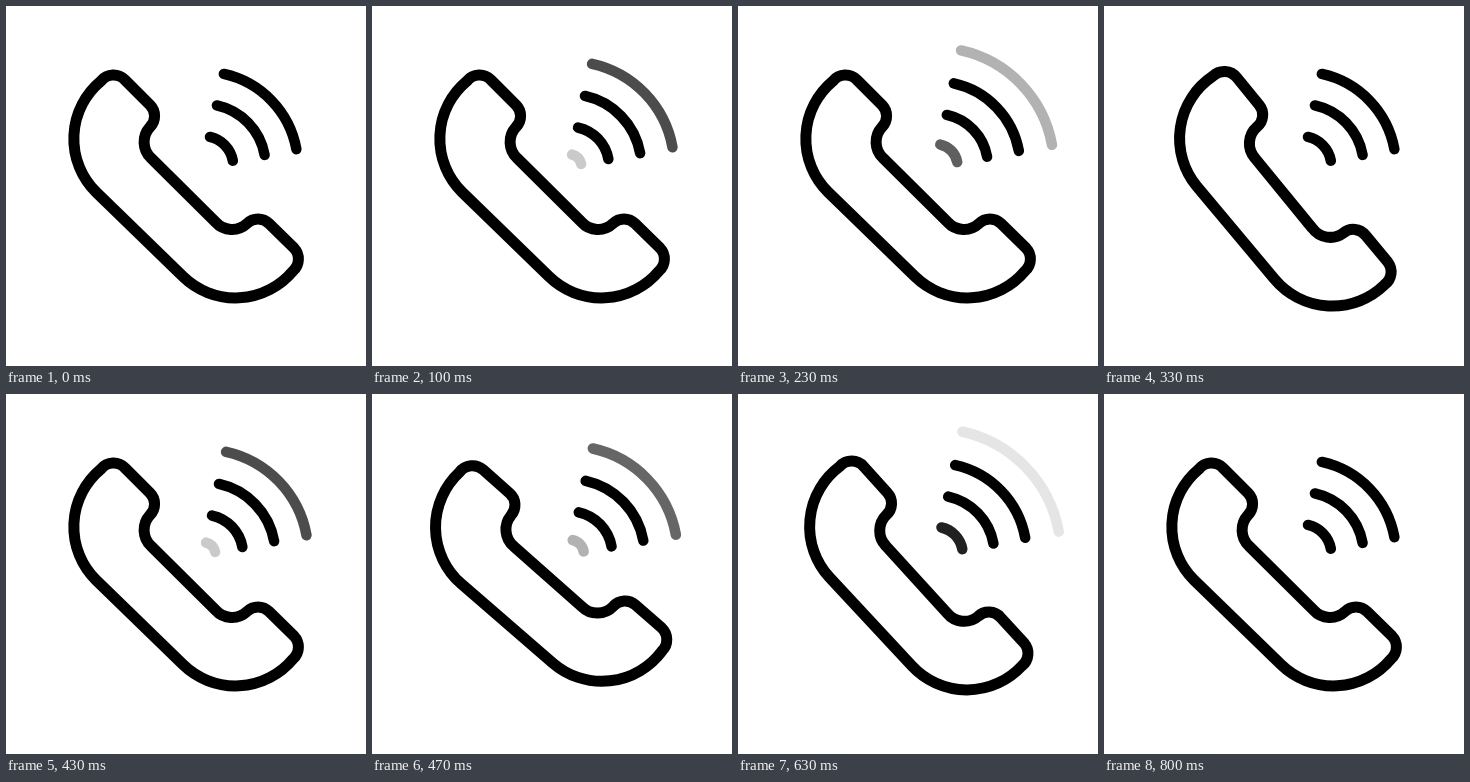
Recreate the animation shown at these times as an HTML page. Size 360 by 360 pixels, loop 830 ms.

```html
<!DOCTYPE html>
<html lang="en">
<head>
<meta charset="utf-8">
<title>Ringing phone</title>
<style>
html, body { margin: 0; width: 100%; height: 100%; overflow: hidden; background: #fff; }
svg { display: block; width: 100vw; height: 100vh; }
path { fill: none; stroke: #000; stroke-width: 10.5; stroke-linecap: round; stroke-linejoin: round; }
#phone { stroke-width: 11; }
</style>
</head>
<body>
<svg viewBox="0 0 360 360">
  <path id="phone" d="M95 75A75 75 0 0 0 90 186L177 270.5A75 75 0 0 0 287 265
    A16 16 0 0 0 288 242L263 217.5A15.5 15.5 0 0 0 241 217.5A22 22 0 0 1 209.5 216
    L145 152A22 22 0 0 1 144 121A15.5 15.5 0 0 0 144 99L119 74A16 16 0 0 0 95 75Z"/>
  <g id="waves"><path/><path/><path/><path/></g>
</svg>
<script>
const LOOP = 830, STEPS = 25, CYCLE = 10;
const phone = document.getElementById('phone');
const waves = [...document.querySelectorAll('#waves path')];
const rad = deg => deg * Math.PI / 180;

// Swing keys: [step, degrees], eased between neighbours
const swing = [[7, 0], [10.3, 6], [15.7, -6], [20.7, 6], [23.2, 0]];

// Radius of each wave: [start of pulse, growth]
const radii = [[4, 25.7], [29.7, 32.3], [62, 32.3], [94.3, 34.3]];

function tilt(s) {
  for (let i = 1; i < swing.length; i++) {
    const [a, from] = swing[i - 1], [b, to] = swing[i];
    if (s >= a && s < b) {
      const u = (s - a) / (b - a);
      return from + (to - from) * (1 - Math.cos(Math.PI * u)) / 2;
    }
  }
  return 0;
}

function arc(r) {
  const at = deg => {
    const x = 197.6 + r * Math.cos(rad(deg));
    const y = 160 + r * Math.sin(rad(deg));
    return x.toFixed(2) + ' ' + y.toFixed(2);
  };
  return `M${at(-77.6)}A${r} ${r} 0 0 1 ${at(-10.3)}`;
}

function draw(time) {
  const t = time % LOOP;
  const s = Math.min(STEPS - 1, Math.floor((t + 4) / (LOOP / STEPS)));
  phone.setAttribute('transform', `rotate(${tilt(s)} 149 208)`);

  // Two outward pulses, then a rest
  const p = s < 2 * CYCLE ? (s % CYCLE) / CYCLE : 0;
  const fade = [p ** 1.3, 1, 1, 1 - p];
  waves.forEach((wave, i) => {
    const [start, growth] = radii[i];
    wave.setAttribute('d', arc(start + growth * p));
    wave.setAttribute('opacity', fade[i]);
  });
}

function tick(now) {
  draw(now);
  requestAnimationFrame(tick);
}
draw(0);
requestAnimationFrame(tick);
</script>
</body>
</html>
```
